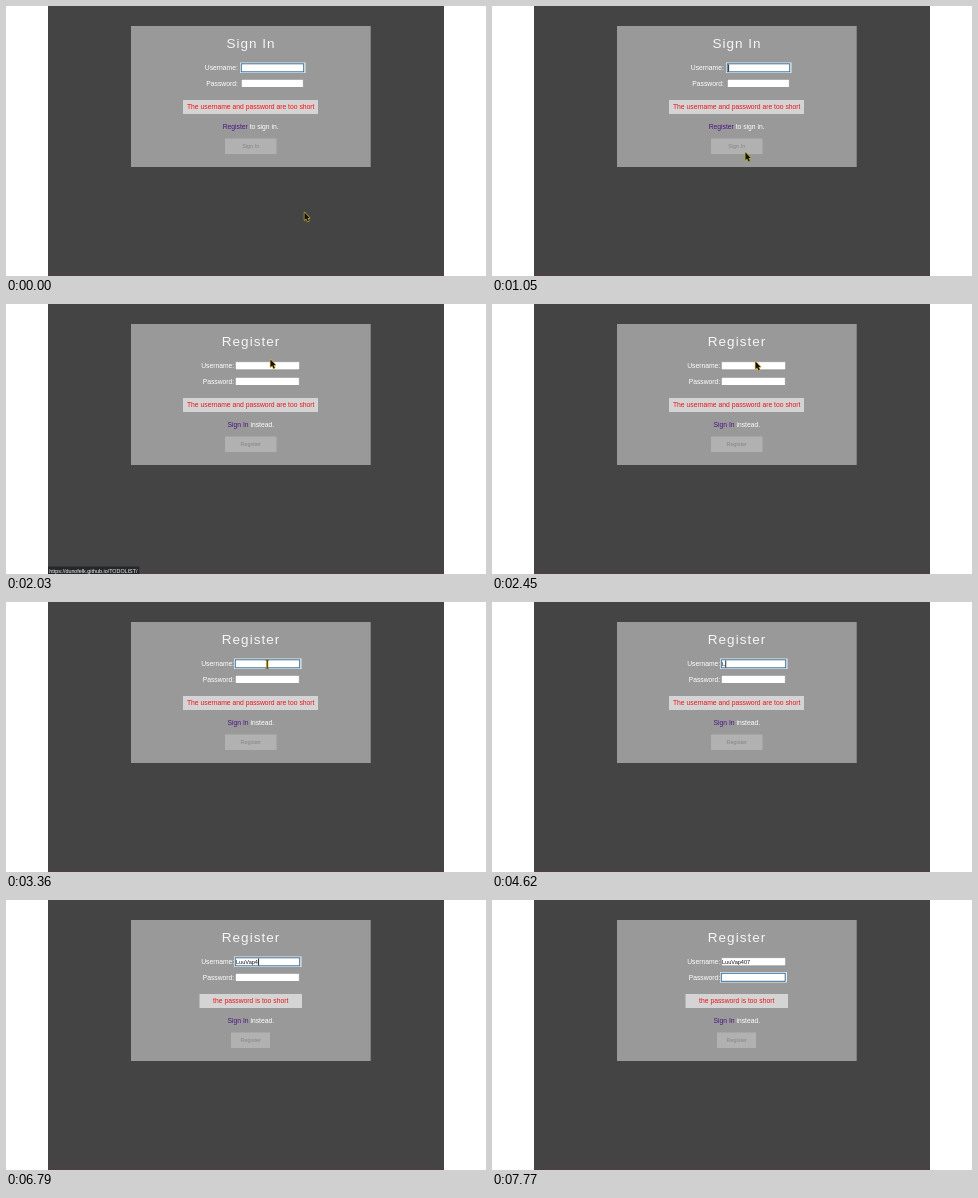
An HTML page with a canvas that plays this animation: 480x270 px, repeating every 8 s.

```html
<!DOCTYPE html>
<html lang="en">
<head>
<meta charset="utf-8">
<title>Sign in and register</title>
<style>
html, body { margin: 0; width: 100%; height: 100%; overflow: hidden; background: #fff; }
canvas { display: block; width: 480px; height: 270px; }
</style>
</head>
<body>
<canvas id="stage" width="480" height="270"></canvas>
<script>
const ctx = document.getElementById('stage').getContext('2d');
const LOOP = 8000, BLINK = 490, STEP = 70;
const REGISTER_AT = 1750, FOCUS_AT = 2730, PASSWORD_AT = 7280, VALID_AT = 6370;
const USER = 'LuuVap407';
const KEY_TIMES = [4550, 5950, 6090, 6230, 6370, 6510, 6720, 6860, 7000];
const SITE = 'https://dunofelk.github.io/TODOLIST';

// start time, x, y, pointer shape
const POINTER = [
  [0, 298, 206, 'arrow'], [770, 281, 183, 'arrow'], [840, 263, 157, 'arrow'],
  [1050, 253, 146, 'arrow'], [1120, 241, 130, 'arrow'], [1190, 232, 121, 'hand'],
  [1820, 234, 118, 'hand'], [1890, 245, 99, 'arrow'], [1960, 257, 73, 'arrow'],
  [2030, 264, 55, 'arrow'], [2450, 263, 57, 'arrow'], [2520, 261, 62, 'beam'],
  [4620, 0, 0, 'none']
];

function box(x, y, w, h, color) {
  ctx.fillStyle = color;
  ctx.fillRect(x, y, w, h);
}

function text(str, x, y, size, color, align = 'left', spacing = 0) {
  ctx.font = size + 'px "Liberation Sans", Arial, sans-serif';
  ctx.letterSpacing = spacing + 'px';
  ctx.textAlign = align;
  ctx.fillStyle = color;
  ctx.fillText(str, x, y);
  const width = ctx.measureText(str).width;
  ctx.letterSpacing = '0px';
  return width;
}

function shape(points, fill, edge) {
  ctx.beginPath();
  points.forEach(([x, y]) => ctx.lineTo(x, y));
  ctx.closePath();
  ctx.lineJoin = 'round';
  ctx.lineWidth = 1.5;
  ctx.strokeStyle = edge;
  ctx.stroke();
  ctx.fillStyle = fill;
  ctx.fill();
}

function field(x, y, w, focused) {
  if (focused) box(x - 1, y - 1, w + 2.5, 10.5, '#e6eef4');
  box(x, y, w, 8.5, '#fff');
  ctx.lineWidth = focused ? 1 : 0.6;
  ctx.strokeStyle = focused ? '#3d7096' : '#777';
  ctx.strokeRect(x + 0.3, y + 0.3, w - 0.6, 8);
}

function caret(x, y) {
  box(x, y, 0.9, 7, '#111');
}

function blinkOn(t, since) {
  return Math.floor((t - since) / BLINK) % 2 === 0;
}

function pointer(t) {
  const [, x, y, kind] = POINTER.filter(p => p[0] <= t).pop();
  ctx.save();
  ctx.translate(x, y);
  if (kind === 'arrow') {
    shape([[0.5, 0.5], [0.5, 8], [2.2, 6.5], [3.6, 9.4], [4.8, 8.8], [3.5, 6], [5.6, 6]],
      '#111', t < 1600 ? '#b5a52c' : '#d6b64a');
  } else if (kind === 'hand') {
    shape([[1.5, 1], [2.6, 1], [3, 4], [6.8, 5], [6.8, 7.5], [5.8, 9.5], [2.8, 9.5], [0.4, 6], [1.6, 6]],
      '#15130a', '#c6a92f');
  } else if (kind === 'beam') {
    box(-1, -4, 2.4, 8.5, '#d9b844');
    box(-0.2, -4, 0.9, 8.5, '#27220f');
    box(-1.5, -4.2, 3.4, 0.8, '#6e5c20');
    box(-1.5, 3.8, 3.4, 0.8, '#6e5c20');
  }
  ctx.restore();
}

function status(url) {
  ctx.font = '5.4px "Liberation Sans", Arial, sans-serif';
  box(42, 262.5, ctx.measureText(url).width + 3, 7.5, '#25272a');
  text(url, 43.2, 268.8, 5.4, '#f4f4f4');
}

function form(t) {
  const registering = t >= REGISTER_AT, valid = t >= VALID_AT;
  const name = registering ? 'Register' : 'Sign In';
  const left = registering ? 229 : 235;
  const width = registering ? 65 : 63;
  const labelEnd = registering ? 228.2 : 231.8;
  const onPassword = t >= PASSWORD_AT;
  const onUser = !onPassword && (!registering || t >= FOCUS_AT);

  text(name, 245, 41.7, 13.5, '#f6f6f6', 'center', 1);
  text('Username:', labelEnd, 64, 6.75, '#fff', 'right');
  text('Password:', labelEnd, 79.8, 6.75, '#fff', 'right');
  field(left, 57.5, width, onUser);
  field(left, 73, width - 0.5, onPassword);

  if (!registering) {
    if (t >= 840 && t < 1330) caret(236.2, 58.5);
  } else {
    const pressed = KEY_TIMES.filter(k => k <= t);
    const typed = text(USER.slice(0, pressed.length), 230, 64, 5.6, '#111');
    if (onUser && blinkOn(t, pressed.pop() || FOCUS_AT)) caret(230.2 + typed, 58.5);
    if (onPassword && blinkOn(t, PASSWORD_AT)) caret(230, 74);
  }

  const red = t < 560 ? '#ff0d0d' : '#e6161c';
  if (valid) box(193.5, 94, 102.5, 14, '#d4d4d4');
  else box(177, 94, 135, 14, '#d4d4d4');
  text(valid ? 'the password is too short' : 'The username and password are too short',
    244.7, 103.2, 6.77, red, 'center');

  const linkX = registering ? 221.5 : 216.7;
  const linkWidth = text(registering ? 'Sign In' : 'Register', linkX, 122.7, 6.75, '#4b1582');
  text(registering ? ' instead.' : ' to sign in.', linkX + linkWidth, 122.7, 6.75, '#fff');

  if (valid) box(225, 132.5, 39, 15.5, '#b1b1b1');
  else box(219, 132.5, 51.5, 15.5, '#b1b1b1');
  text(name, 244.7, 142.2, 5.5, '#858585', 'center');
}

function draw(t) {
  box(0, 0, 480, 270, '#fff');
  box(42, 0, 396, 270, '#444');
  box(42, 267, 396, 3, '#4b4145');
  box(125, 20, 239.7, 141, '#999');
  form(t);
  if (t >= 1400 && t < REGISTER_AT) status(SITE + '#register');
  else if (t >= REGISTER_AT && t < 2310) status(SITE + '/');
  pointer(t);
}

function tick() {
  const t = performance.now() % LOOP;
  draw(Math.floor(t / STEP) * STEP);
  requestAnimationFrame(tick);
}
tick();
</script>
</body>
</html>
```
